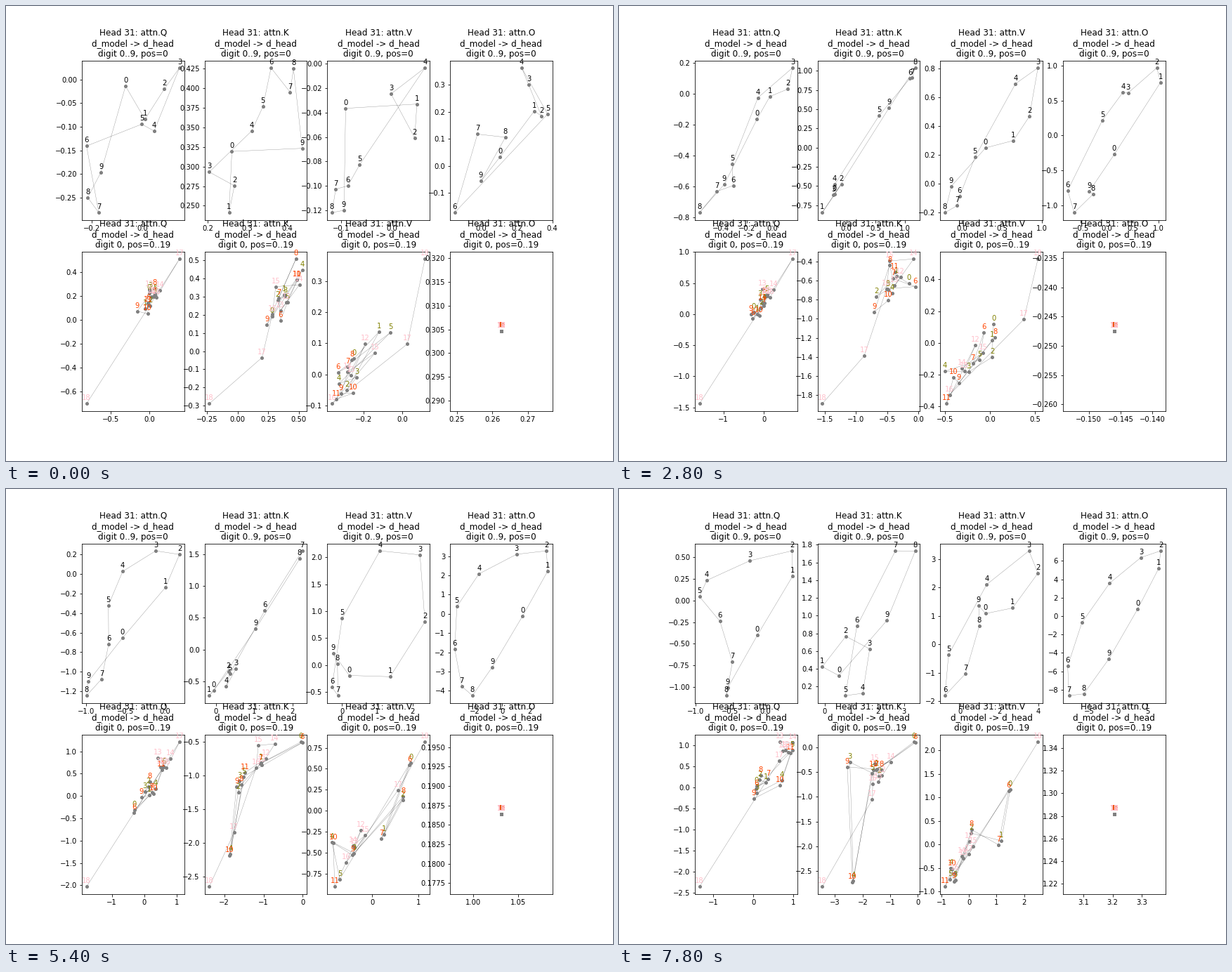
A matplotlib script for the animation above (8000 ms loop, 864 by 648 pixels).

```python
import numpy as np
import matplotlib.pyplot as plt
from matplotlib.animation import FuncAnimation

STEP, COUNT = 200, 40
HEADS = "QKVO"
THETA = 2 * np.pi * np.arange(10) / 10

# Every panel passes four stages: scatter, split, ring, end.
# Digits lie on closed curves: cos and sin weights of x, then of y, per harmonic.
SPLIT = {
    "Q": {1: (11, 45, 29, 90), 3: (17, -12, 36, 10)},
    "K": {1: (-23, -71, -42, -106), 3: (-21, -22, -38, -31)},
    "V": {1: (1, 62, 24, 102), 3: (14, 7, 31, 6)},
    "O": {1: (2, 39, 2, 63), 3: (-14, 16, -22, 16)},
}
RING = {
    "Q": {1: (-4, 54, -18, 87), 2: (-8, 17, -2, 0)},
    "K": {1: (-11, -44, -17, -67), 2: (-28, 6, -34, 1)},
    "V": {1: (-4, 57, -58, 53), 2: (-21, 5, -3, -52)},
    "O": {1: (42, 38, -14, 105), 2: (-8, 13, 9, 10)},
}
END = {
    "Q": {1: (41, 31, -25, 84), 2: (-17, 29, 1, 24)},
    "K": {1: (-4, -31, 11, -53), 2: (-27, -23, -54, 6)},
    "V": {1: (27, 47, 29, 65), 2: (-29, -3, -22, -42)},
    "O": {1: (40, 56, 10, 108), 2: (-3, 3, 7, 3)},
}

# Positions 0..11 repeat with period six, 12..16 share a cloud, 17 and 18 stand alone.
# Early: cloud centre, place of 17, place of 18, spread.
EARLY = {
    "Q": ((70, 72), (100, 100), (0, 0), 6),
    "K": ((67, 68), (48, 30), (0, 0), 9),
    "V": ((37, 20), (85, 42), (100, 100), 13),
}
# Later: the six repeating places, the cloud, 17.
LATER = {
    "Q": [[(45, 43), (64, 58), (64, 65), (60, 61), (63, 61), (70, 73), (71, 72), (100, 100)],
          [(61, 63), (72, 68), (64, 69), (61, 58), (86, 67), (97, 86), (88, 84), (84, 80)]],
    "K": [[(94, 88), (51, 75), (18, 52), (31, 57), (14, 24), (27, 65), (53, 83), (14, 23)],
          [(99, 100), (58, 79), (61, 75), (29, 84), (30, 1), (52, 77), (61, 77), (53, 59)]],
    "V": [[(91, 92), (53, 35), (97, 71), (31, 32), (2, 40), (9, 3), (29, 31), (91, 86)],
          [(70, 65), (58, 27), (29, 37), (11, 3), (8, 12), (2, 0), (20, 18), (26, 21)]],
}

# Left, right, bottom, top at each stage
DIGIT_VIEW = {
    "Q": [(-.239, .165, -.297, .04), (-.277, .212, -.445, .25),
          (-1.076, .152, -1.374, .164), (-1.01, .46, -1.184, .66)],
    "K": [(.192, .45, .232, .4355), (-.613, .84, -.768, .812),
          (-.303, 1.87, -1.2, 1.612), (-.274, 3.6, .017, 1.813)],
    "V": [(-.127, .075, -.128, .0027), (-.348, .514, -.334, .284),
          (-.152, 1.754, -.134, 1.713), (-1.03, 4.22, -2.064, 3.55)],
    "O": [(-.176, .4, -.199, .389), (-.386, .654, -.27, .529),
          (-1.506, 1.84, -2.62, 1.889), (-9.46, 8.08, -9.43, 7.885)],
}
PLACE_VIEW = {
    "Q": [(-.873, .45, -.76, .571), (-1.424, .506, -1.224, .724),
          (-2.117, 1.284, -2.055, 1.423), (-1.467, 1.1, -2.528, 1.252)],
    "K": [(-.272, .567, -.329, .547), (-1.33, -.042, -1.489, -.057),
          (-2.034, .122, -2.68, -.66), (-3.631, .073, -2.965, .257)],
    "V": [(-.386, .139, -.117, .394), (-.281, .533, -.071, .749),
          (-.955, .655, -.965, .313), (-1.04, 2.67, -1.055, 2.33)],
}
SPOT = [(.2625, .3046), (-.3264, -.2326), (.1246, -.2699), (3.2056, 1.2814)]


def stage(t):
    # Quick first jump, a pause, a second jump, then a slow drift
    return np.interp(t, [0, 800, 2000, 3600, 4400, 7800], [0, .9, 1, 1.8, 2, 3])


def blend(poses, s):
    poses = np.asarray(poses, float)
    k = min(int(s), len(poses) - 2)
    return poses[k] + (poses[k + 1] - poses[k]) * (s - k)


def unit(pts):
    low, high = pts.min(axis=0), pts.max(axis=0)
    return (pts - low) / (high - low)


def curve(waves):
    pts = np.zeros((10, 2))
    for k, (ax, bx, ay, by) in waves.items():
        c, s = np.cos(k * THETA), np.sin(k * THETA)
        pts += np.column_stack([ax * c + bx * s, ay * c + by * s])
    return unit(pts)


def digit_poses(h, rng):
    split = curve(SPLIT[h])
    scatter = unit(split + rng.normal(0, .3, split.shape))
    return [scatter, split, curve(RING[h]), curve(END[h])]


def place_poses(h, rng):
    centre, tail, last, spread = EARLY[h]
    # Clouds stretch along the diagonal
    noise = rng.normal(size=(19, 1)) + .5 * rng.normal(size=(19, 2))
    noise[17:] = 0
    tight = np.where(np.arange(19) < 12, 1.5, 7)[:, None]
    which = [n % 6 if n < 12 else max(6, n - 10) for n in range(19)]
    poses = []
    for keys, size in [([centre] * 7 + [tail], spread)] * 2 + [(k, tight) for k in LATER[h]]:
        poses.append(np.array(keys + [last], float)[which] + noise * size)
    return poses


def place_color(n):
    return ("olive", "orangered", "pink")[min(n // 6, 2)]


class Panel:
    def __init__(self, ax, title, colors, closed=False):
        self.ax, self.closed = ax, closed
        ax.set_title(title)
        self.line, = ax.plot([], [], color="gray", lw=.35)
        self.dots, = ax.plot([], [], "o", color="gray", ms=4)
        self.tags = [ax.annotate(str(n), (0, 0), xytext=(0, 5), ha="center",
                                 textcoords="offset points", color=c)
                     for n, c in enumerate(colors)]

    def show(self, pts, view):
        self.ax.set_xlim(view[:2])
        self.ax.set_ylim(view[2:])
        path = np.vstack([pts, pts[:1]]) if self.closed else pts
        self.line.set_data(*path.T)
        self.dots.set_data(*pts.T)
        for tag, p in zip(self.tags, pts):
            tag.xy = p

    def fill(self, shape, view):
        # Stretch the shape over the view, less the usual 5% margins
        low, high = view[::2], view[1::2]
        self.show(low + (high - low) * (.05 + unit(shape)) / 1.1, view)


fig, axes = plt.subplots(2, 4, figsize=(12, 9), dpi=72)
TITLE = "Head 31: attn.{}\nd_model -> d_head\n{}"
PLACE_COLORS = [place_color(n) for n in range(19)]
digits = {h: Panel(ax, TITLE.format(h, "digit 0..9, pos=0"), ["black"] * 10, True)
          for h, ax in zip(HEADS, axes[0])}
places = {h: Panel(ax, TITLE.format(h, "digit 0, pos=0..19"), PLACE_COLORS)
          for h, ax in zip(HEADS, axes[1])}

rng = np.random.default_rng(31)
digit_paths = {h: digit_poses(h, rng) for h in HEADS}
place_paths = {h: place_poses(h, rng) for h in LATER}


def update(i):
    s = stage(i * STEP)
    for h, poses in digit_paths.items():
        digits[h].fill(blend(poses, s), blend(DIGIT_VIEW[h], s))
    for h, poses in place_paths.items():
        places[h].fill(blend(poses, s), blend(PLACE_VIEW[h], s))
    # In the last panel all positions share one spot
    x, y = blend(SPOT, s)
    dx, dy = .055 * abs(x), .055 * abs(y)
    places["O"].show(np.tile([x, y], (19, 1)), [x - dx, x + dx, y - dy, y + dy])
    return []


anim = FuncAnimation(fig, update, frames=COUNT, interval=STEP, repeat=True,
                     repeat_delay=0, init_func=lambda: update(0))
plt.show()
```
